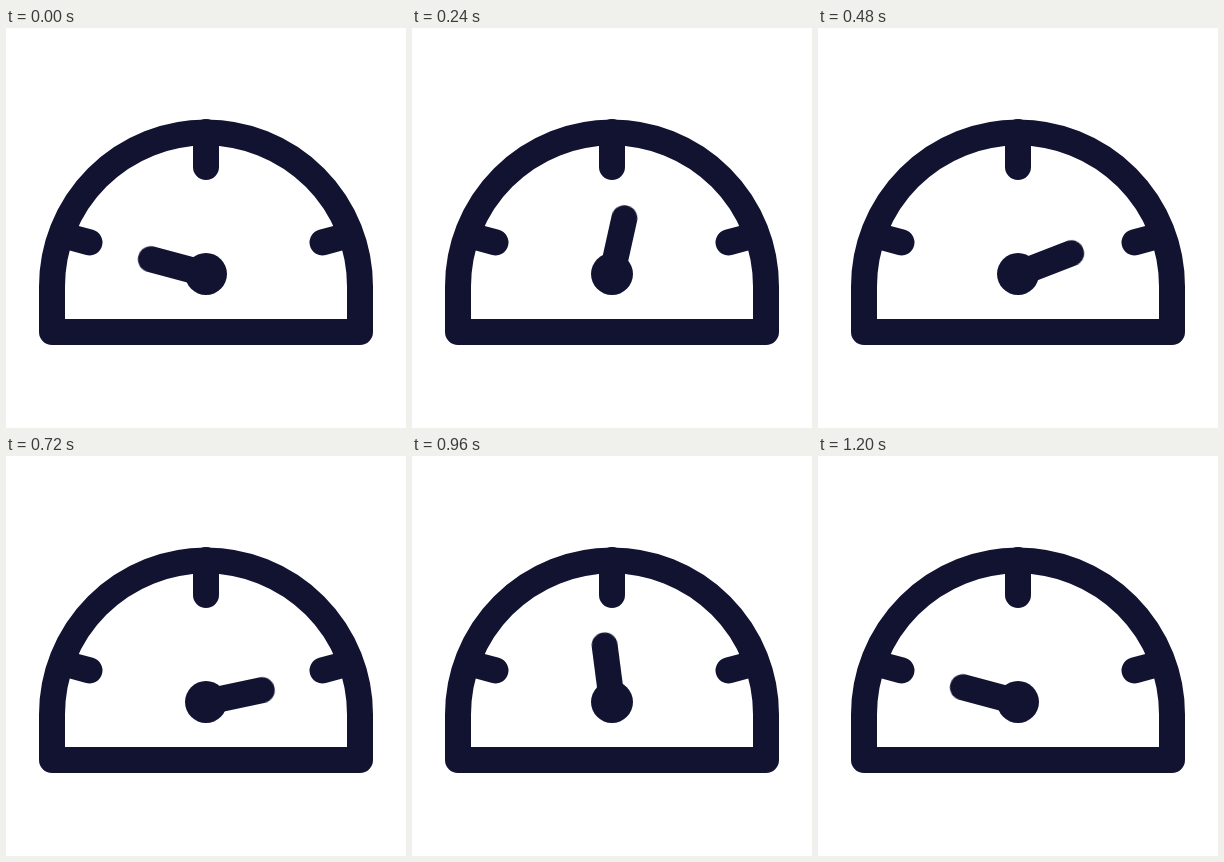
An HTML page that plays this animation: 400x400 px, repeating every 3.23 s.

```html
<!DOCTYPE html>
<html lang="en">
<head>
<meta charset="utf-8">
<title>Gauge</title>
<style>
  html, body { margin: 0; width: 100%; height: 100%; overflow: hidden; background: #fff; }
  svg { display: block; width: 100%; height: 100%; }
  .line { fill: none; stroke: #121331; stroke-width: 26; stroke-linecap: round; stroke-linejoin: round; }
  .hub { fill: #121331; }
  .needle { transform-origin: 200px 246px; animation: sweep 3230ms infinite; }

  /* quick rise, long settle, then a drop back and a rest */
  @keyframes sweep {
    0% { transform: rotate(15deg); animation-timing-function: cubic-bezier(.385, 0, .1, 1); }
    22.29% { transform: rotate(168deg); animation-timing-function: cubic-bezier(.62, 0, .33, 1); }
    37.15%, 100% { transform: rotate(15deg); }
  }
</style>
</head>
<body>
<svg viewBox="0 0 400 400">
  <path class="line" d="M46 304V258.5a154 154 0 0 1 308 0V304Z"/>
  <path class="line" d="M200 104V139M57 207.3L83.5 214.4M343 207.3L316.5 214.4"/>
  <path class="line needle" d="M200 246H143"/>
  <circle class="hub" cx="200" cy="246" r="21"/>
</svg>
</body>
</html>
```
